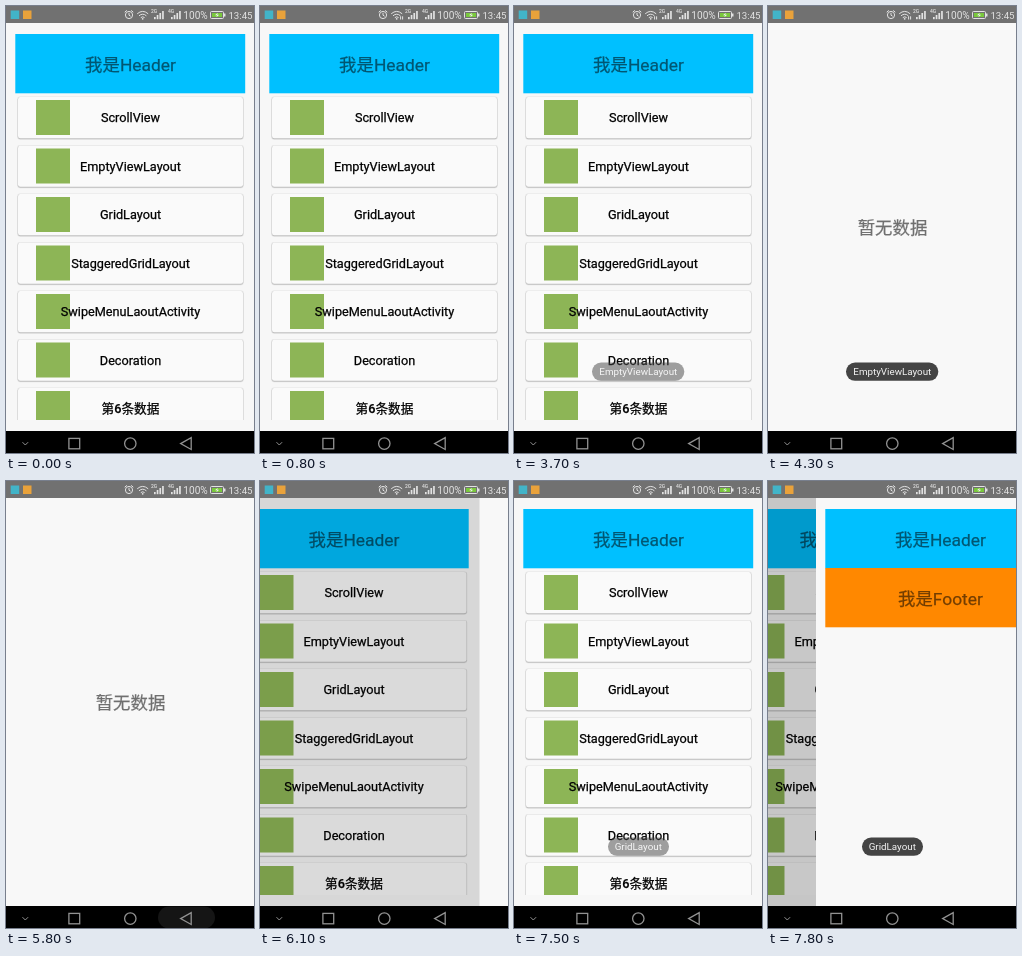
Write an HTML page that moves like this. It is 248x447 px and loops after 8000 ms.

```html
<!DOCTYPE html>
<html lang="zh-CN">
<head>
<meta charset="utf-8">
<title>List demo</title>
<style>
html, body { margin: 0; width: 100%; height: 100%; overflow: hidden; background: #000; }
svg { display: block; width: 100%; height: 100%; }
text { font-family: Roboto, "Noto Sans CJK SC", "Noto Sans CJK", sans-serif; text-anchor: middle; }
.row { font-size: 12.7px; stroke: #000; stroke-width: .25; }
.big { font-size: 17.4px; stroke: #000; stroke-width: .25; opacity: .55; }
.tip { font-size: 9.8px; fill: #f4f4f4; }
.bar text { fill: #e2e2e2; text-anchor: start; }
.line { fill: none; stroke: #e2e2e2; }
.nav { fill: none; stroke: #929292; stroke-width: 1.3; }
</style>
</head>
<body>
<svg viewBox="0 0 248 447">
  <defs>
    <clipPath id="port"><rect x="8" y="27" width="232" height="387"/></clipPath>
  </defs>
  <g id="list">
    <rect width="320" height="425" fill="#f7f7f7"/>
    <g id="rows" clip-path="url(#port)"></g>
  </g>
  <rect id="dim" y="17" width="248" height="408"/>
  <g id="empty">
    <rect width="248" height="425" fill="#f8f8f8"/>
    <text class="big" x="124.5" y="228">暂无数据</text>
  </g>
  <g id="grid"><rect width="248" height="425" fill="#f8f8f8"/></g>
  <g id="toast">
    <rect id="pill" y="356.5" height="18.3" rx="9.1" fill="#444"/>
    <text id="tip" class="tip" x="124.3" y="369.3"></text>
  </g>
  <g class="bar">
    <rect width="248" height="17" fill="#000" fill-opacity=".54"/>
    <rect x="4.7" y="4.5" width="8.5" height="8.5" fill="#42b4c8"/>
    <rect x="17" y="4.5" width="8.5" height="8.5" fill="#e9a23b"/>
    <g class="line">
      <circle cx="123" cy="9" r="3.6"/>
      <path d="M123 6.8V9.2L124.6 10.2M118.7 6.2L120.8 4.4M127.3 6.2L125.2 4.4"/>
      <path d="M131.2 7.8Q136.7 3 142.2 7.8M133 9.8Q136.7 6.6 140.4 9.8M134.8 11.6Q136.7 10 138.6 11.6"/>
      <path id="traffic" d="M140.6 13.5V10.3M142.6 10.3V13.5"/>
    </g>
    <circle cx="136.7" cy="12.8" r=".9" fill="#e2e2e2"/>
    <g id="signal"></g>
    <text x="177.3" y="12.9" font-size="10.1">100%</text>
    <rect class="line" x="204.5" y="5.5" width="13" height="7" rx="1"/>
    <rect x="206" y="7" width="10" height="4" fill="#79c83c"/>
    <path d="M211.8 6.8L209 9.3H211L210.4 11.2L213.2 8.7H211.2Z" fill="#eee"/>
    <rect x="218" y="7.5" width="1.5" height="3" fill="#e2e2e2"/>
    <text x="222.4" y="12.9" font-size="9.7">13:45</text>
  </g>
  <rect y="425" width="248" height="22"/>
  <rect id="press" x="152" y="425.5" width="57" height="22" rx="11" fill="#151515"/>
  <g class="nav">
    <path d="M16.5 436.2L19.3 439L22.1 436.2" stroke-width="1"/>
    <rect x="62.9" y="432.4" width="10.8" height="10.4"/>
    <circle cx="124.3" cy="437.6" r="5.7"/>
    <path d="M174.6 437.6L185.2 431.7V443.5Z"/>
  </g>
</svg>
<script>
const LOOP = 8000;
const $ = id => document.getElementById(id);
const labels = ['ScrollView', 'EmptyViewLayout', 'GridLayout', 'StaggeredGridLayout',
  'SwipeMenuLaoutActivity', 'Decoration', '第6条数据'];

function add(parent, tag, attrs, text = '') {
  const el = document.createElementNS('http://www.w3.org/2000/svg', tag);
  for (const k in attrs) el.setAttribute(k, attrs[k]);
  el.textContent = text;
  return parent.appendChild(el);
}

function banner(parent, y, fill, text) {
  add(parent, 'rect', { x: 9.3, y, width: 229.9, height: 59.3, fill });
  add(parent, 'text', { class: 'big', x: 124.5, y: y + 37 }, text);
}

// Card with a soft two-layer shadow, heavier at the bottom.
function card(parent, x, y, width, height) {
  const layer = (grow, top, drop, fill) => add(parent, 'rect', {
    x: x - grow, y: y + top, width: width + 2 * grow, height: height + drop - top, rx: 2.4, fill
  });
  layer(.8, -.4, 1.4, 'rgba(0,0,0,.08)');
  layer(.3, .2, .9, 'rgba(0,0,0,.16)');
  layer(0, 0, 0, '#fafafa');
}

banner($('rows'), 28, '#00c0ff', '我是Header');
labels.forEach((label, i) => {
  const y = 91 + i * 48.5;
  card($('rows'), 12, y, 225, 41.3);
  add($('rows'), 'rect', { x: 30, y: y + 3, width: 34, height: 35, fill: '#8db556' });
  add($('rows'), 'text', { class: 'row', x: 124.5, y: y + 25.3, 'font-weight': i === 6 ? 500 : 400 }, label);
});

banner($('grid'), 28, '#00c0ff', '我是Header');
banner($('grid'), 87, '#ff8800', '我是Footer');

[['2G', 145], ['4G', 162]].forEach(([net, x]) => {
  add($('signal'), 'text', { x, y: 7, 'font-size': 5, 'font-weight': 500 }, net);
  for (let i = 0; i < 4; i++) {
    const h = 2.2 + i * 2;
    add($('signal'), 'rect', { x: x + 3 + i * 2.7, y: 13.2 - h, width: 1.7, height: h, fill: '#e2e2e2' });
  }
});

// Each step holds until the next one; x values are page offsets, 248 is off stage.
const steps = [
  { at: 0 },
  { at: 800, traffic: 1 },
  { at: 3700, traffic: 1, tip: 1, alpha: .5 },
  { at: 3800, traffic: 1, tip: 1, alpha: 1 },
  { at: 4300, traffic: 1, tip: 1, alpha: 1, empty: 0 },
  { at: 4800, tip: 1, alpha: 1, empty: 0 },
  { at: 5500, tip: 1, alpha: .5, empty: 0 },
  { at: 5800, empty: 0, press: 1 },
  { at: 6100, empty: 219.5, list: -30.5, dim: .13 },
  { at: 6400 },
  { at: 7500, tip: 2, alpha: .5 },
  { at: 7800, tip: 2, alpha: 1, grid: 48, list: -47.5, dim: .2 }
];
const rest = { traffic: 0, tip: 0, alpha: 0, empty: 248, grid: 248, list: 0, dim: 0, press: 0 };
const pills = [[78, 0], [78, 92.3], [94, 61]];

const shift = (id, x) => $(id).setAttribute('transform', `translate(${x})`);
const fade = (id, a) => $(id).setAttribute('opacity', a);

function draw(t) {
  const s = { ...rest, ...steps.findLast(step => step.at <= t) };
  ['list', 'empty', 'grid'].forEach(id => shift(id, s[id]));
  ['dim', 'press', 'traffic'].forEach(id => fade(id, s[id]));
  fade('toast', s.alpha);
  const [x, width] = pills[s.tip];
  $('pill').setAttribute('x', x);
  $('pill').setAttribute('width', width);
  $('tip').textContent = s.tip ? labels[s.tip] : '';
}

const start = performance.now();
function tick() {
  draw((performance.now() - start) % LOOP);
  requestAnimationFrame(tick);
}
tick();
</script>
</body>
</html>
```
